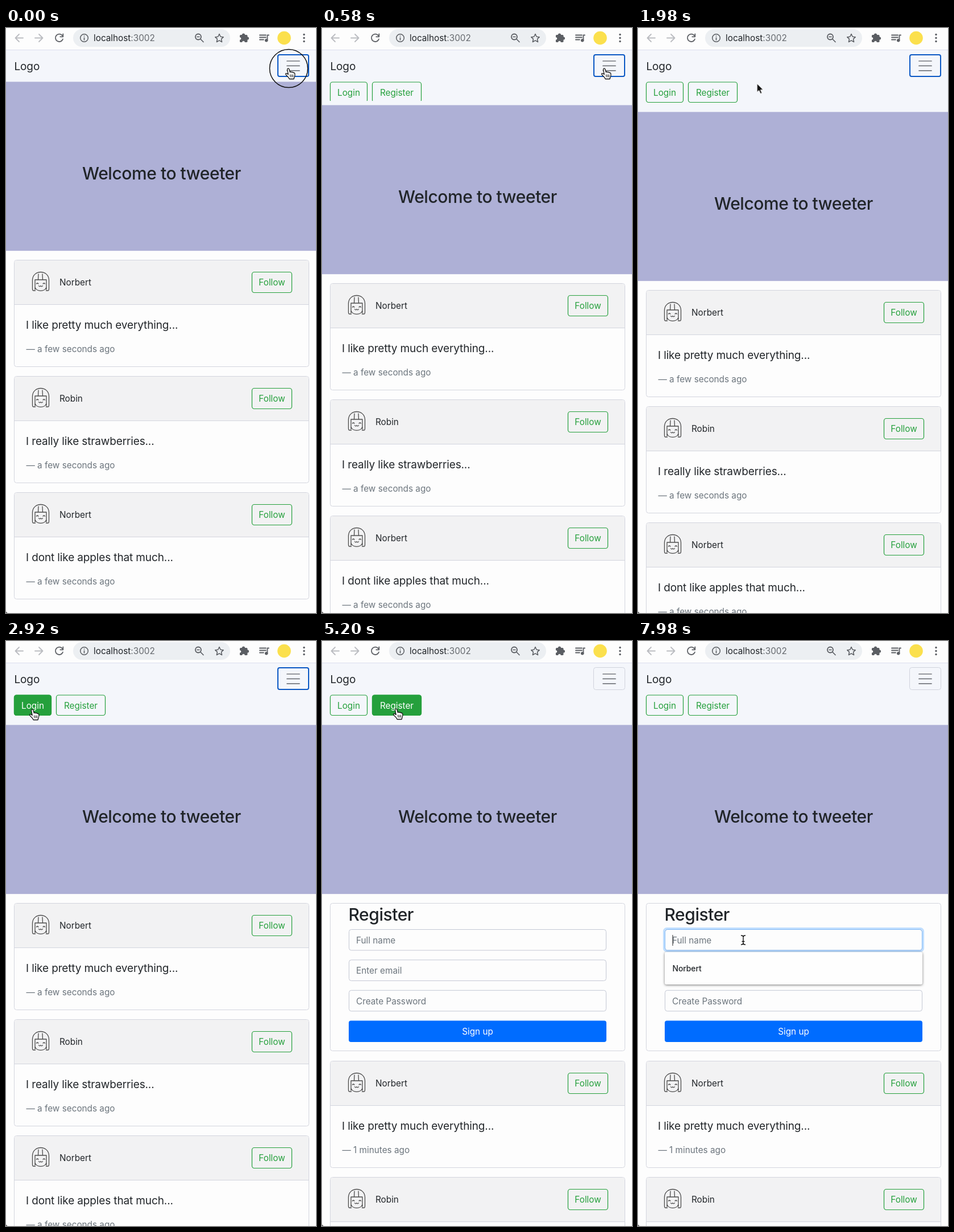
An HTML page for the animation above (8000 ms loop, 545x1027 px).

```html
<!DOCTYPE html>
<html lang="en">
<head>
<meta charset="utf-8">
<title>Welcome</title>
<style>
html, body { margin: 0; width: 100%; height: 100%; overflow: hidden; background: #fdfdfd; }
svg { display: block; }
#stage { width: 100%; height: 100%; font: 15.3px Inter, "Open Sans", sans-serif; fill: #212529; }

.line { fill: none; stroke-linecap: round; stroke-linejoin: round; }
.big { font-size: 19px; letter-spacing: -.007em; }
.title { font-size: 30px; font-weight: 500; letter-spacing: -.015em; }
.mid { text-anchor: middle; }
.muted { fill: #6c757d; }
.green { fill: #25a03c; }
.white { fill: #fff; }
.box { fill: #fdfdfd; stroke: #d3d5de; }
.outline { fill: none; stroke: #25a03c; stroke-width: 1.2; }
.icon { stroke: #5b5e63; stroke-width: 1.8; }

.fold, .cards, .login, .register, .focus, .form, .early, .active, .menu,
.pointer, .hand, .arrow, .beam, .ring { animation: 8s linear infinite; }
.cards, .focus, .form, .early, .active, .menu, .hand, .arrow, .beam, .ring { animation-timing-function: step-end; }
.login, .register { animation-timing-function: ease-in-out; }

.fold { animation-name: fold; }
.cards { animation-name: cards; }
.login { animation-name: login; }
.register { animation-name: register; }
.focus { animation-name: focus; }
.form { animation-name: form; }
.early { animation-name: early; }
.active { animation-name: active; }
.menu { animation-name: menu; }
.pointer { animation-name: pointer; }
.hand { animation-name: hand; }
.arrow { animation-name: arrow; }
.beam { animation-name: beam; }
.ring { animation-name: ring; }

@keyframes fold {
  0% { transform: translateY(0); }
  4.25% { transform: translateY(0); animation-timing-function: ease; }
  10.625%, 100% { transform: translateY(53px); }
}
@keyframes cards { 0% { transform: none; } 63%, 100% { transform: translateY(277px); } }
@keyframes login { 0%, 30.5% { opacity: 0; } 33%, 55.2% { opacity: 1; } 57.7%, 100% { opacity: 0; } }
@keyframes register {
  0%, 26.2% { opacity: 0; } 28.8%, 29.8% { opacity: 1; } 32.3%, 55.6% { opacity: 0; }
  58.1%, 77.5% { opacity: 1; } 80.4%, 100% { opacity: 0; }
}
@keyframes focus { 0% { opacity: 1; } 59.75%, 100% { opacity: 0; } }
@keyframes form { 0% { opacity: 0; } 63%, 100% { opacity: 1; } }
@keyframes early { 0% { opacity: 1; } 63%, 100% { opacity: 0; } }
@keyframes active { 0% { opacity: 0; } 94.5%, 100% { opacity: 1; } }
@keyframes menu { 0% { opacity: 0; } 97%, 100% { opacity: 1; } }
@keyframes pointer {
  0%, 20% { transform: translate(497px, 71px); }
  22% { transform: translate(400px, 85px); }
  24.75% { transform: translate(209.5px, 97.5px); }
  30% { transform: translate(84px, 110px); }
  32.5%, 53.75% { transform: translate(47px, 120px); }
  57.5%, 76.6% { transform: translate(131px, 119px); }
  77.5% { transform: translate(140px, 150px); }
  79% { transform: translate(242.5px, 459px); }
  81% { transform: translate(205px, 518px); }
  82.75%, 100% { transform: translate(185px, 525px); }
}
@keyframes hand { 0% { opacity: 1; } 21.1% { opacity: 0; } 26.2% { opacity: 1; } 77.5%, 100% { opacity: 0; } }
@keyframes arrow { 0% { opacity: 0; } 21.1% { opacity: 1; } 26.2% { opacity: 0; } 77.5% { opacity: 1; } 80.6%, 100% { opacity: 0; } }
@keyframes beam { 0% { opacity: 0; } 80.6%, 100% { opacity: 1; } }
@keyframes ring {
  0% { opacity: 1; } 3.75% { opacity: 0; } 59.75% { opacity: 1; } 62.5% { opacity: 0; }
  94.5% { opacity: 1; } 96.5%, 100% { opacity: 0; }
}
</style>
</head>
<body>
<svg id="stage" viewBox="0 0 545 1027" preserveAspectRatio="none">
  <defs>
    <g id="girl" class="line" stroke="#4c4c4c" stroke-width="1.3">
      <path d="M-9.5 16H-13Q-14.6 16-14.5 12V-3C-13.5-21 13.5-21 14.5-3V12Q14.6 16 13 16H9.5"/>
      <path d="M-10-3V14M10-3V14M-10 10C-8 18.5 8 18.5 10 10M-10-3H10M-4.5-3L-4-13M3.5-3L3-13"/>
      <path d="M-7.5 4q1.7-2 3.4 0M4.1 4q1.7-2 3.4 0M-3.4 7.5q1.7 2.6 3.4 0q1.7 2.6 3.4 0"/>
    </g>
  </defs>

  <rect width="545" height="1027" fill="#fdfdfd"/>
  <rect y="38" width="545" height="110" fill="#f4f6fb"/>
  <g id="buttons"></g>

  <g class="fold">
    <rect y="87" width="545" height="9" fill="#f4f6fb"/>
    <rect y="94.4" width="545" height="297" fill="#aeb0d6"/>
    <rect y="391.4" width="545" height="640" fill="#fdfdfd"/>
    <text class="title mid" x="273.5" y="266">Welcome to tweeter</text>
    <g class="cards" id="cards"></g>
  </g>

  <g class="form">
    <rect class="box" x="14.5" y="460.5" width="518" height="259" rx="4"/>
    <text class="title" x="46.5" y="491">Register</text>
    <g id="fields"></g>
    <rect x="47" y="666.5" width="453" height="37.5" rx="4" fill="#006cff"/>
    <text class="mid white" x="273.5" y="691">Sign up</text>
  </g>
  <g class="active">
    <rect x="45.5" y="504.5" width="456" height="40" rx="5" fill="none" stroke="#bfdeff" stroke-width="3"/>
    <rect x="47.5" y="506.5" width="452" height="36.5" rx="4" fill="none" stroke="#80b8f5"/>
    <path d="M61 516V535" stroke="#222"/>
  </g>
  <g class="menu">
    <rect x="47" y="546" width="453" height="57" rx="3" fill="#fefefe" style="filter:drop-shadow(0 1px 2px #0008)"/>
    <text x="60.5" y="579.5" font-size="13.8" font-weight="500">Norbert</text>
  </g>

  <text class="big" x="14.5" y="73.5">Logo</text>
  <rect x="477.5" y="46.5" width="55" height="39" rx="4" fill="none" stroke="#d0d3dc"/>
  <path class="line" d="M494 58H516M494 66.4H516M494 74.8H516" stroke="#75787e" stroke-width="1.7"/>
  <rect class="focus" x="478" y="47" width="54" height="38" rx="3" fill="none" stroke="#0b58c4" stroke-width="2"/>

  <g id="toolbar">
    <rect width="545" height="38" fill="#fdfdfd"/>
    <path d="M0 38.5H545" stroke="#dadded"/>
    <rect x="118" y="2" width="276" height="31" rx="15.5" fill="#eceff2"/>
    <path class="line" d="M30 17.5H17M23 11L16.5 17.5L23 24M51 17.5H64M58 11L64.5 17.5L58 24" stroke="#bbbdc1" stroke-width="1.8"/>
    <g class="line icon">
      <path d="M99 13.2A6.7 6.7 0 1 0 100 19.5M100.3 10.5V15.3H95.3"/>
      <circle cx="137.5" cy="17.5" r="6.8" stroke-width="1.5"/>
      <path d="M137.5 17V21M137.5 14V14.2" stroke-width="1.6"/>
      <circle cx="338" cy="15.5" r="5"/>
      <path d="M342 19.5L347 24.5M336 15.5H340" stroke-width="1.7"/>
      <path d="M375 10.5L377.2 15.3L382.3 15.9L378.5 19.4L379.6 24.5L375 21.9L370.4 24.5L371.5 19.4L367.7 15.9L372.8 15.3Z" stroke-width="1.5"/>
      <path d="M446 12.5H457M446 16.5H457M446 20.5H453M459.5 22V12.5H462"/>
    </g>
    <g fill="#5b5e63">
      <circle cx="457.7" cy="21.8" r="2.7"/>
      <rect x="411" y="12" width="13.5" height="13" rx="1.6"/>
      <circle cx="417.5" cy="12" r="2.6"/><circle cx="424.5" cy="18" r="2.6"/>
      <circle cx="524" cy="11.5" r="1.7"/><circle cx="524" cy="17.5" r="1.7"/><circle cx="524" cy="23.5" r="1.7"/>
    </g>
    <g fill="#fdfdfd"><circle cx="411" cy="18.5" r="2.3"/><circle cx="417.5" cy="25" r="2.3"/></g>
    <circle cx="489" cy="17.5" r="11.8" fill="#fbe04d"/>
    <text x="154" y="23">localhost<tspan fill="#666a6f">:3002</tspan></text>
  </g>
  <path d="M0 1023Q0 1027 4 1027H0Z" fill="#333"/>

  <g class="pointer">
    <circle class="ring" r="33.5" fill="none" stroke="#111" stroke-width="1.5"/>
    <g class="hand line" stroke="#111" stroke-width="1.3">
      <path fill="#fff" d="M-2.5 1.5Q-1-1.5 .8 1.2L2.3 6.5Q4 5 5.2 6.8Q7 5.6 8 7.6Q10.2 7 10.7 9Q11.3 12 10 15L9 18.5H1.2Q0 15.5-3 13Q-6.3 10-5 8.8Q-3.5 7.8-.8 10.5Z"/>
      <path d="M2.5 11L3 15M5 11L5.3 15M7.5 11V15" stroke-width="1"/>
    </g>
    <path class="arrow" d="M0 0V15.2L3.5 12L6 17.8L8.7 16.6L6.2 11H11Z" fill="#111" stroke="#fff"/>
    <g class="beam line">
      <path d="M-3.5-8Q0-8 0-5.5V5.5Q0 8-3.5 8M3.5-8Q0-8 0-5.5M0 5.5Q0 8 3.5 8M-2 2.5H2" stroke="#fff" stroke-width="3"/>
      <path d="M-3.5-8Q0-8 0-5.5V5.5Q0 8-3.5 8M3.5-8Q0-8 0-5.5M0 5.5Q0 8 3.5 8M-2 2.5H2" stroke="#111" stroke-width="1.4"/>
    </g>
  </g>
</svg>
<script>
const fill = (id, items, draw) => {
  document.getElementById(id).innerHTML = items.map(draw).join("");
};

const posts = [
  ["Norbert", "I like pretty much everything..."],
  ["Robin", "I really like strawberries..."],
  ["Norbert", "I dont like apples that much..."]
];
fill("cards", posts, ([name, message], i) => `
  <g transform="translate(0 ${407 + i * 204})">
    <rect class="box" x="14.5" y=".5" width="518" height="187" rx="4"/>
    <path d="M15 78.5V4.5Q15 1 18.5 1H528.5Q532 1 532 4.5V78.5Z" fill="#f2f2f3"/>
    <path d="M15 78.5H532" stroke="#d3d5de"/>
    <use href="#girl" x="61" y="38"/>
    <text x="94" y="45">${name}</text>
    <rect class="outline" x="432.5" y="21.5" width="70" height="36" rx="4"/>
    <text class="green mid" x="467.5" y="45">Follow</text>
    <text class="big" x="35" y="121">${message}</text>
    <g class="muted">
      <text class="early" x="35.5" y="162">— a few seconds ago</text>
      <text class="form" x="35.5" y="162">— 1 minutes ago</text>
    </g>
  </g>`);

const buttons = [["Login", 14.5, 65], ["Register", 88.5, 86]];
fill("buttons", buttons, ([label, x, width]) => {
  const frame = `x="${x}" y="95" width="${width}" height="35.5" rx="4"`;
  const text = `x="${x + width / 2}" y="119"`;
  return `
    <rect class="outline" ${frame}/>
    <text class="green mid" ${text}>${label}</text>
    <g class="${label.toLowerCase()}">
      <rect ${frame} fill="#25a03c" stroke="#25a03c" stroke-width="1.2"/>
      <text class="mid white" ${text}>${label}</text>
    </g>`;
});

fill("fields", ["Full name", "Enter email", "Create Password"], (label, i) => {
  const y = 506.5 + i * 53.4;
  return `
    <rect class="box" x="47.5" y="${y}" width="452" height="36.5" rx="4" style="stroke:#c4c8d4"/>
    <text class="muted" x="60" y="${y + 24.5}">${label}</text>`;
});
</script>
</body>
</html>
```
